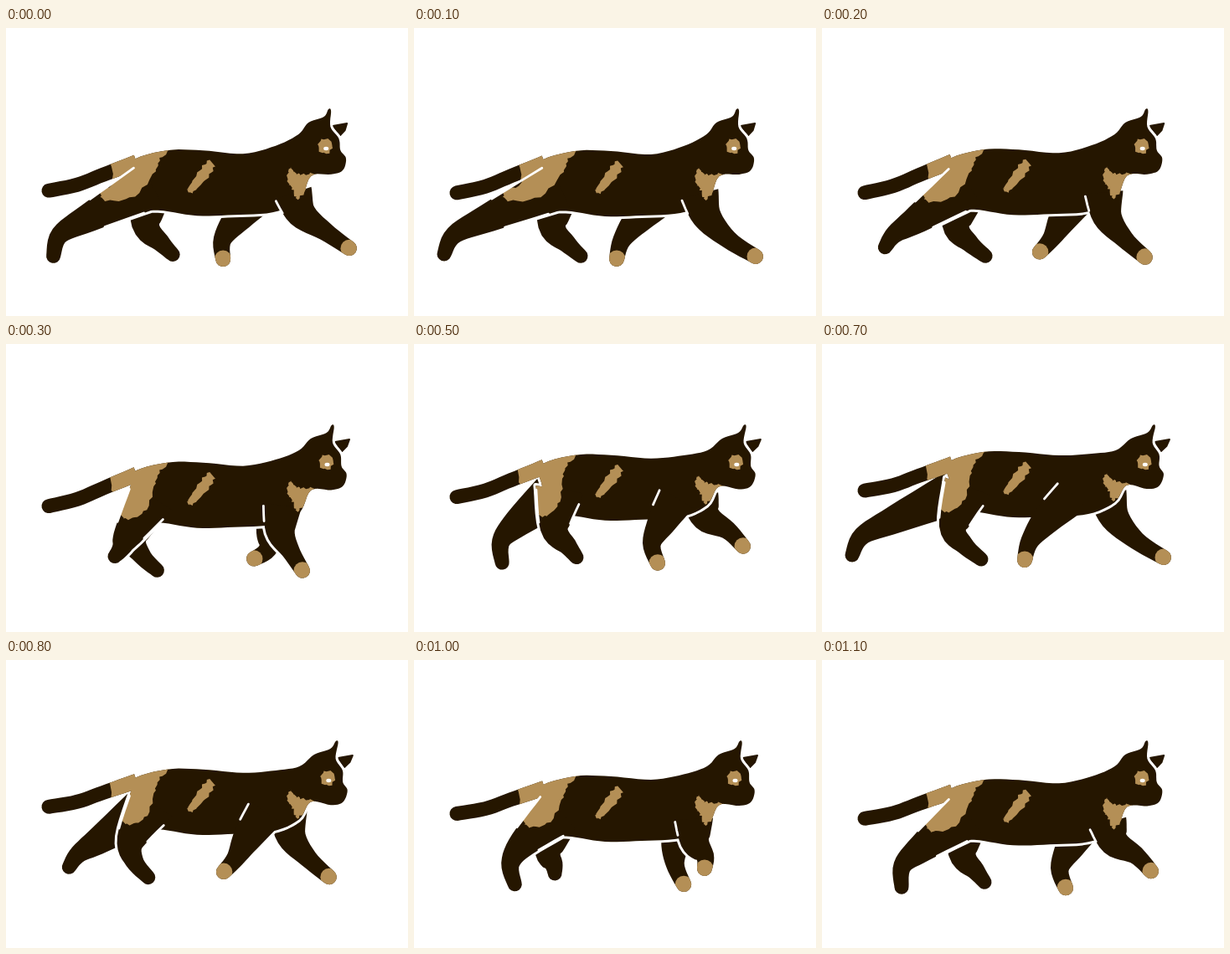
Write an HTML page that moves like this. It is 480x344 px and loops after 1.2 s.

```html
<!DOCTYPE html>
<html lang="en">
<head>
<meta charset="utf-8">
<title>Walking cat</title>
<style>
html, body { margin: 0; width: 100%; height: 100%; overflow: hidden; background: #fff; }
svg { display: block; width: 100%; height: 100%; }
path { fill: #251600; }
.tan { fill: #b48f56; }
.line { fill: none; stroke: #fff; stroke-linecap: round; stroke-linejoin: round; }
</style>
</head>
<body>
<svg id="stage" viewBox="0 0 480 344"></svg>
<script>
const STEP = 100, COUNT = 12;
const parse = text => text.split(" ").map(pair => pair.split(",").map(Number));
const clamp = v => Math.max(0, Math.min(1, v));
const mod = (v, n) => ((v % n) + n) % n;
const wave = (step, peak) => Math.cos((step - peak) / COUNT * 2 * Math.PI);
const lerp = (a, b, u) => a.map((v, k) => v + (b[k] - v) * u);

// Resting shapes, for a ground line at y = 275.
const rest = {
  torso: parse("150,151 192,138 235,138 283,142 322,136 350,127 365,113 384,106 390,97 393,99 391,118 400,132 401,146 407,156 402,170 388,174 364,173 350,198 318,212 272,215 228,216 188,210 153,206 153,176"),
  tail: parse("156,152 116,167 85,179 51,186"),
  chest: parse("339,161 346,168 356,170 370,172 360,184 348,196 342,184 336,174"),
  rump: parse("126,140 160,125 199,132 184,148 178,163"),
  side: parse("246,153 236,166 221,185"),
  ear: parse("394,117 411,114 408,122 402,128"),
  eye: parse("384,144")
};

// Knee, ankle and toe at six even moments of a stride.
const strides = {
  hind: ["88,218 48,238 36,261", "145,225 137,241 130,250", "168,226 184,247 194,260",
         "157,228 171,250 190,266", "140,218 133,245 144,267", "118,220 96,241 95,266"].map(parse),
  fore: ["350,217 376,244 408,264", "328,220 340,244 354,267", "296,218 284,244 291,267",
         "268,219 248,245 242,267", "316,220 312,242 296,253", "350,213 375,228 393,247"].map(parse)
};
const widths = { hind: [58, 34, 22, 17], fore: [46, 35, 22, 18] };

// Catmull-Rom value between b and c.
const spline = (a, b, c, d, u) => b.map((v, k) =>
  v + u / 2 * (c[k] - a[k] + u * (2 * a[k] - 5 * v + 4 * c[k] - d[k] + u * (3 * (v - c[k]) + d[k] - a[k]))));

function sample(pts, closed, density = 6) {
  const n = pts.length, out = [];
  const at = i => closed ? pts[mod(i, n)] : pts[Math.max(0, Math.min(n - 1, i))];
  for (let j = 0; j < (closed ? n : n - 1) * density; j++) {
    const i = Math.floor(j / density);
    out.push(spline(at(i - 1), at(i), at(i + 1), at(i + 2), j / density - i));
  }
  return closed ? out : [...out, pts[n - 1]];
}

const line = pts => "M" + pts.map(p => p.map(v => v.toFixed(1))).join("L");
const area = pts => line(pts) + "Z";
const blob = pts => area(sample(pts, true));
const ragged = pts => area(pts.map(([x, y], i) =>
  [x + 1.2 * Math.sin(i * 2.4), y + 1.2 * Math.cos(i * 1.9)]));

// Tapered tube along joints, with a round end.
function tube(joints, sizes) {
  const mid = sample(joints, false), front = [], rear = [], cap = [];
  const size = sample(sizes.map(w => [w]), false);
  mid.forEach(([x, y], i) => {
    const a = mid[Math.max(0, i - 1)], b = mid[Math.min(mid.length - 1, i + 1)];
    const angle = Math.atan2(b[1] - a[1], b[0] - a[0]), r = size[i][0] / 2;
    const edge = turn => [x + r * Math.cos(angle + turn), y + r * Math.sin(angle + turn)];
    front.push(edge(-Math.PI / 2));
    rear.push(edge(Math.PI / 2));
    if (i === mid.length - 1) for (let k = -3; k <= 3; k++) cap.push(edge(k * Math.PI / 8));
  });
  return { front, rear, outline: [...front, ...cap, ...rear.reverse()], rear: rear.slice().reverse() };
}

function leg(kind, phase, bob) {
  const keys = strides[kind], u = mod((phase - 1) / 2, 6), i = Math.floor(u);
  const key = k => keys[mod(i + k, 6)];
  const joints = key(0).map((p, j) => spline(key(-1)[j], p, key(1)[j], key(2)[j], u - i));
  const root = kind === "hind" ? [174, 179] : [166 + joints[0][0] / 2, 189];
  const placed = [root, ...joints].map(([x, y]) => [x, y + bob]);
  return { ...tube(placed, widths[kind]), toe: placed[3] };
}

// The body rises and sinks with the ground while the head only nods.
function pose(step) {
  const bob = 9 * wave(step, 0.8), nod = 5 * wave(step, 6.5), swish = 4 * wave(step, 3);
  const place = ([x, y]) => [
    x + nod * clamp((x - 345) / 20) * (170 - y) / 70,
    y + bob * clamp((370 - x) / 60 + (y - 150) / 60)
  ];
  const body = {};
  for (const part in rest) body[part] = rest[part].map(place);

  const opposite = step + COUNT / 2;
  const linger = 1.5 * Math.max(0, wave(opposite, 8.5));
  const hind = leg("hind", step, bob), fore = leg("fore", step, bob);
  const farHind = leg("hind", opposite - linger, bob), farFore = leg("fore", opposite, bob);

  const tail = body.tail.map(([x, y]) => [x, y + swish * (156 - x) / 105]);
  const tip = hind.rear[4], inner = lerp(tip, hind.front[4], 0.3);
  const rump = [...body.rump, lerp(hind.rear[2], hind.front[2], 0.55), inner, tip, place([128, 176])];
  const [eyeX, eyeY] = body.eye[0];
  const mask = Array.from({ length: 18 }, (_, i) =>
    [eyeX - 1 + 8.5 * Math.cos(i * Math.PI / 9), eyeY - 3 + 9 * Math.sin(i * Math.PI / 9)]);

  const d = {
    torso: blob(body.torso), tail: area(tube(tail, [18, 17, 17, 17]).outline),
    hind: area(hind.outline), fore: area(fore.outline),
    farHind: area(farHind.outline), farFore: area(farFore.outline),
    ear: area(body.ear), rump: ragged(sample(rump, true)), chest: ragged(sample(body.chest, true)),
    side: ragged(tube(body.side, [10, 13, 8]).outline), mask: ragged(mask),
    seams: line(hind.rear.slice(1, 6)) + line(hind.front.slice(2, 6)) + line(fore.rear.slice(1, 5))
  };
  d.halo = d.torso + d.hind + d.fore;
  return { d, spots: { eye: [eyeX, eyeY], paw: fore.toe, farPaw: farFore.toe } };
}

const NS = "http://www.w3.org/2000/svg";
const stage = document.getElementById("stage");
const shapes = [], spots = {};

function add(tag, attrs = {}, parent = stage) {
  const node = document.createElementNS(NS, tag);
  for (const key in attrs) node.setAttribute(key, attrs[key]);
  return parent.appendChild(node);
}

function shape(name, attrs, parent) {
  shapes.push({ name, node: add("path", attrs, parent) });
}

function clip(id, names) {
  const node = add("clipPath", { id });
  names.forEach(name => shape(name, {}, node));
  return { class: "tan", "clip-path": `url(#${id})` };
}

const onBody = clip("body", ["torso", "tail", "hind", "fore"]);
shape("farHind");
shape("farFore");
spots.farPaw = add("circle", { r: 10.5, ...clip("farLeg", ["farFore"]) });
shape("ear", { stroke: "#251600", "stroke-width": 2, "stroke-linejoin": "round" });
shape("halo", { class: "line", "stroke-width": 6 });
["tail", "torso", "hind", "fore"].forEach(name => shape(name));
spots.paw = add("circle", { r: 10.5, ...clip("nearLeg", ["fore"]) });
["rump", "side", "chest", "mask"].forEach(name => shape(name, onBody));
spots.eye = add("ellipse", { rx: 3, ry: 2.2, fill: "#fff" });
shape("seams", { class: "line", "stroke-width": 2.8 });

const poses = Array.from({ length: COUNT }, (_, step) => pose(step));

function draw(time) {
  const { d, spots: centres } = poses[Math.floor(time / STEP) % COUNT];
  for (const { name, node } of shapes) node.setAttribute("d", d[name]);
  for (const name in spots) {
    spots[name].setAttribute("cx", centres[name][0]);
    spots[name].setAttribute("cy", centres[name][1]);
  }
}

const start = performance.now();
function tick() {
  draw(performance.now() - start);
  requestAnimationFrame(tick);
}
tick();
</script>
</body>
</html>
```
